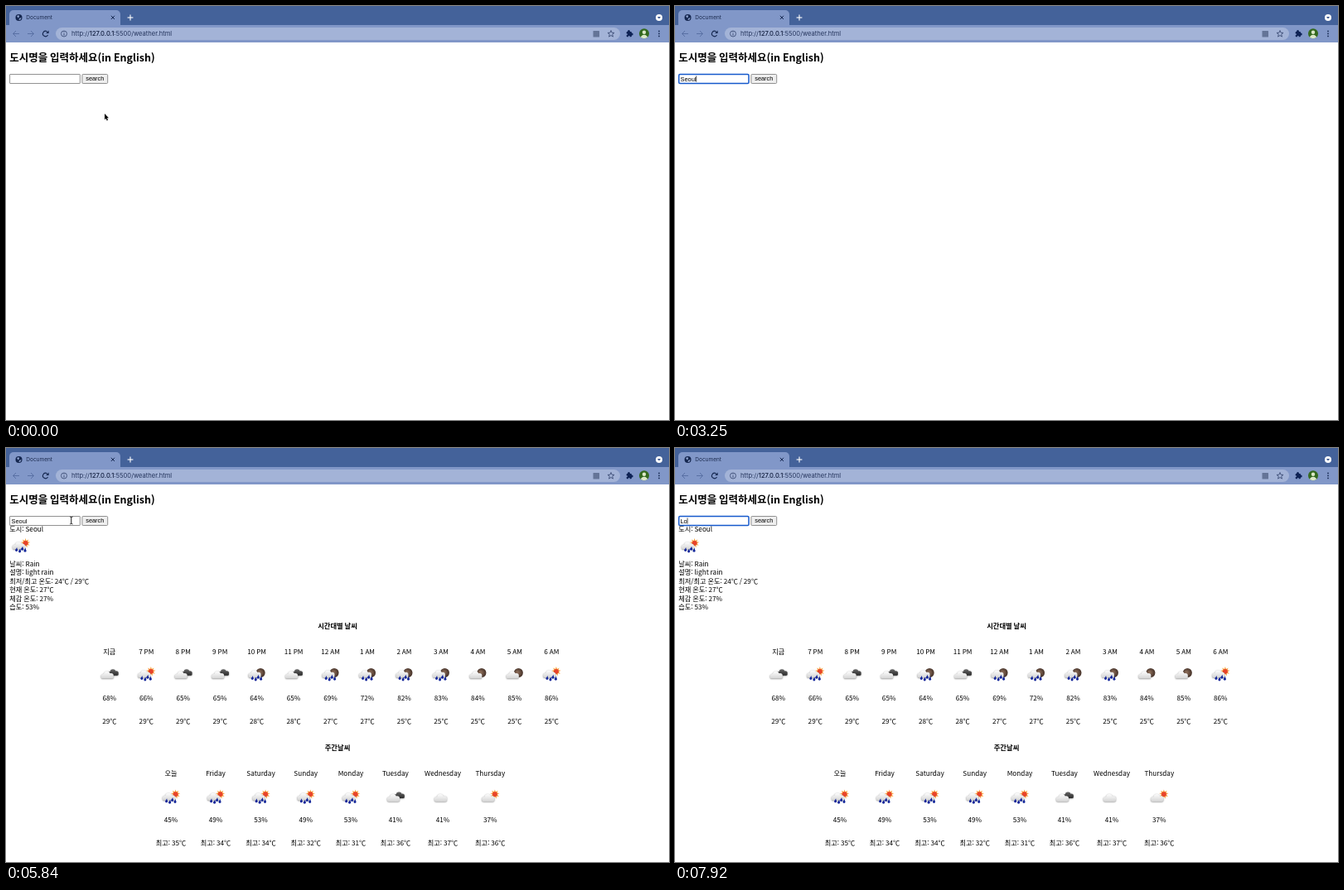
An HTML page with a canvas for the animation above (8 s loop, 800x500 px).

```html
<!DOCTYPE html>
<html lang="ko">
<head>
<meta charset="utf-8">
<title>Weather search</title>
<style>
html, body { margin: 0; width: 100%; height: 100%; overflow: hidden; background: #fff; }
canvas { display: block; width: 800px; height: 500px; }
</style>
</head>
<body>
<canvas id="stage" width="800" height="500"></canvas>
<script>
const ctx = document.getElementById('stage').getContext('2d');
const LOOP = 8000, STEP = 1000 / 12;
const KOREAN = '"Noto Sans CJK KR", "Noto Sans CJK", "Noto Sans", sans-serif';
const BODY = '8.2px ' + KOREAN;
const BOLD = 'bold 8.3px ' + KOREAN;
const FORM = '7.4px "Liberation Sans", Arial, sans-serif';
const INK = '#14264f';

const typing = [[0, ''], [1750, 'ㄴ'], [2250, ''], [2660, 'S'], [2750, 'Se'], [2830, 'Seo'],
  [3000, 'Seou'], [3080, 'Seoul'], [7080, 'Seou'], [7160, 'Seo'], [7250, 'Se'], [7330, 'S'],
  [7410, ''], [7660, 'L'], [7910, 'Lo']];
const focusSpans = [[830, 4250], [6660, LOOP]];
const hiddenSpans = [[1750, 3740], [7080, LOOP]];
const moves = [[0, 119, 130], [160, 119, 130], [166, 95, 107], [410, 95, 107], [750, 61, 88],
  [3740, 61, 88], [4160, 105, 86], [5410, 105, 86], [6160, 61, 88], [LOOP, 61, 88]];
const RESULTS_AT = 4740;

const inside = (spans, t) => spans.find(([a, b]) => t >= a && t < b);
const latest = (keys, t) => keys.filter(k => k[0] <= t).pop();

function text(str, x, y, font, color = '#000', align = 'left') {
  ctx.font = font;
  ctx.fillStyle = color;
  ctx.textAlign = align;
  ctx.fillText(str, x, y);
  return x + ctx.measureText(str).width;
}

function disc(x, y, r, color) {
  ctx.fillStyle = color;
  ctx.beginPath();
  ctx.arc(x, y, r, 0, Math.PI * 2);
  ctx.fill();
}

function line(points, color, width = 1, close = false) {
  ctx.beginPath();
  points.forEach(([x, y]) => ctx.lineTo(x, y));
  if (close) ctx.closePath();
  ctx.strokeStyle = color;
  ctx.lineWidth = width;
  ctx.stroke();
}

function shape(points, color) {
  ctx.beginPath();
  points.forEach(([x, y]) => ctx.lineTo(x, y));
  ctx.closePath();
  ctx.fillStyle = color;
  ctx.fill();
}

function ring(x, y, r, color, width, from = 0, to = Math.PI * 2) {
  ctx.beginPath();
  ctx.arc(x, y, r, from, to);
  ctx.strokeStyle = color;
  ctx.lineWidth = width;
  ctx.stroke();
}

function box(x, y, w, h, r, fill, stroke, width = 0.8) {
  ctx.beginPath();
  ctx.roundRect(x, y, w, h, r);
  if (fill) { ctx.fillStyle = fill; ctx.fill(); }
  if (stroke) { ctx.strokeStyle = stroke; ctx.lineWidth = width; ctx.stroke(); }
}

const starPoints = (x, y, outer, inner, spikes) =>
  Array.from({ length: spikes * 2 }, (_, i) => {
    const a = i * Math.PI / spikes - Math.PI / 2, r = i % 2 ? inner : outer;
    return [x + r * Math.cos(a), y + r * Math.sin(a)];
  });

function drawTabs() {
  ctx.fillStyle = '#44629a';
  ctx.fillRect(0, 0, 800, 24);
  ctx.fillStyle = '#8197c8';
  ctx.fillRect(0, 23, 800, 21);
  box(4, 5, 134, 20, [5, 5, 0, 0], '#8197c8');
  disc(15.5, 14, 4, INK);
  shape([[13, 12], [15.5, 11], [16, 13], [14.5, 14.5]], '#8fa3cf');
  shape([[16, 15], [18.5, 14], [17.5, 16.5], [15.5, 17]], '#8fa3cf');
  text('Document', 24.3, 16.3, '6.5px Inter, sans-serif', '#1d2c50');
  line([[126.8, 11.8], [131, 16]], INK);
  line([[131, 11.8], [126.8, 16]], INK);
  line([[146.6, 14], [153.4, 14]], '#fff', 1.1);
  line([[150, 10.6], [150, 17.4]], '#fff', 1.1);
  disc(788, 14, 4, '#fff');
  shape([[786, 13], [790, 13], [788, 15.5]], '#34508a');
}

function drawToolbar() {
  const pale = '#5970a4';
  line([[16, 33.5], [8.7, 33.5]], pale);
  line([[12, 30], [8.5, 33.5], [12, 37]], pale);
  line([[26, 33.5], [33.3, 33.5]], pale);
  line([[30, 30], [33.5, 33.5], [30, 37]], pale);
  ring(47.7, 33.5, 3.2, INK, 1.1, 0.5, 5.4);
  shape([[51.6, 29.6], [51.6, 33.1], [48.1, 33.1]], INK);

  box(60, 26, 681, 15, 7.5, '#a3b3d7');
  ring(70, 33.5, 3.5, '#34456e', 0.8);
  line([[70, 33], [70, 35.6]], '#34456e', 0.9);
  line([[70, 31.2], [70, 32.1]], '#34456e', 0.9);
  const url = '7.6px Inter, sans-serif';
  let x = text('http://', 79, 36.1, url, '#26365e');
  x = text('127.0.0.1', x, 36.1, '500 ' + url, '#101d3e');
  text(':5500/weather.html', x, 36.1, url, '#26365e');

  box(708.5, 30, 7.5, 7.5, 0.5, '#647497');
  line(starPoints(730, 33.7, 4.2, 1.8, 5), '#34456e', 0.8, true);
  box(748.7, 31, 6.2, 6.2, 0.8, '#0e2255');
  disc(751.5, 30.6, 1.5, '#0e2255');
  disc(755.2, 34, 1.5, '#0e2255');
  disc(748.9, 34.2, 1, '#8197c8');
  disc(751.8, 37.1, 1, '#8197c8');

  ctx.save();
  ctx.beginPath();
  ctx.arc(770, 33.3, 6, 0, Math.PI * 2);
  ctx.clip();
  ctx.fillStyle = '#33691e';
  ctx.fillRect(763, 26, 14, 15);
  disc(770, 31.8, 2.2, '#dce8c8');
  disc(770, 39, 4.2, '#dce8c8');
  ctx.restore();
  [30.4, 33.4, 36.4].forEach(y => disc(788, y, 0.85, INK));
}

function cloud(x, y, scale, top, bottom) {
  ctx.save();
  ctx.translate(x, y);
  ctx.scale(scale, scale);
  const fill = ctx.createLinearGradient(0, -5, 0, 5);
  fill.addColorStop(0, top);
  fill.addColorStop(1, bottom);
  ctx.beginPath();
  [[-5.5, 1.6, 2.9], [-1, -0.6, 4], [4, 1, 3.2]].forEach(([cx, cy, r]) => {
    ctx.moveTo(cx + r, cy);
    ctx.arc(cx, cy, r, 0, Math.PI * 2);
  });
  ctx.roundRect(-8.3, 0.8, 15.5, 3.7, 1.8);
  ctx.shadowColor = '#0007';
  ctx.shadowBlur = 1.8;
  ctx.shadowOffsetY = 0.5;
  ctx.fillStyle = fill;
  ctx.fill();
  ctx.restore();
}

// Letters: s sun, m moon, d dark cloud, r rain; the white cloud is always there.
function weather(kind, x, y) {
  const has = c => kind.includes(c);
  if (has('s')) {
    shape(starPoints(x + 5.6, y - 3.2, 5.7, 3, 9), '#f7a03c');
    disc(x + 5.6, y - 3.2, 2.9, '#e8432b');
  }
  if (has('m')) {
    const g = ctx.createRadialGradient(x + 3, y - 2, 1, x + 4.5, y - 1.5, 6);
    g.addColorStop(0, '#8a6b57');
    g.addColorStop(1, '#3f2d25');
    disc(x + 4.5, y - 1.5, 5.5, g);
  }
  if (has('d')) cloud(x + 5, y - 2, 0.82, '#686868', '#292929');
  cloud(x - 2, y + (has('r') ? 0 : 1.2), 0.98, '#fff', '#d2d2d2');
  if (has('r')) {
    [[-5.4, 5.6], [-1.4, 7], [1.6, 4.3], [5, 6.2]].forEach(([dx, dy]) => {
      disc(x + dx, y + dy, 1.45, '#14279a');
      shape([[x + dx - 1.3, y + dy - 0.4], [x + dx + 0.5, y + dy - 3.6], [x + dx + 1.4, y + dy]], '#14279a');
    });
  }
}

function drawForm(t, focused, hover) {
  text('도시명을 입력하세요(in English)', 4.2, 66.6, 'bold 12.5px ' + KOREAN);
  const [since, value] = latest(typing, t);
  if (focused) box(4.7, 82.6, 84.3, 11, 1.3, '#fff', '#1659cc', 1.5);
  else box(4.6, 82.5, 84.7, 11, 0.4, '#fff', '#767676');

  const end = text(value, 6.5, 90.6, value === 'ㄴ' ? '7.4px ' + KOREAN : FORM);
  if (value === 'ㄴ') line([[6.8, 91.9], [end - 0.3, 91.9]], '#000', 0.7);
  if (focused) {
    const start = Math.max(since, focused[0]);
    if ((t - start) % 1000 < 500) line([[end + 0.3, 84.5], [end + 0.3, 91.6]], '#000', 0.7);
  }
  box(91.9, 82.5, 30.8, 11, 1.2, hover ? '#dedede' : '#efefef', hover ? '#4f4f4f' : '#767676');
  text('search', 107.3, 90.4, FORM, '#000', 'center');
}

const hourNames = ['지금', '7 PM', '8 PM', '9 PM', '10 PM', '11 PM', '12 AM', '1 AM', '2 AM',
  '3 AM', '4 AM', '5 AM', '6 AM'];
const hourIcons = 'd sr d d mr d mr mr mr mr m m sr'.split(' ');
const hourHumidity = [68, 66, 65, 65, 64, 65, 69, 72, 82, 83, 84, 85, 86];
const hourTemps = [29, 29, 29, 29, 28, 28, 27, 27, 25, 25, 25, 25, 25];
const days = [['오늘', 199, 'sr', 45, 35], ['Friday', 253, 'sr', 49, 34], ['Saturday', 307.5, 'sr', 53, 34],
  ['Sunday', 361.7, 'sr', 49, 32], ['Monday', 416, 'sr', 53, 31], ['Tuesday', 470, 'd', 41, 36],
  ['Wednesday', 527, '', 41, 37], ['Thursday', 584.3, 's', 37, 36]];

function drawResults() {
  const center = (str, x, y, font = BODY) => text(str, x, y, font, '#000', 'center');
  text('도시: Seoul', 4.3, 101.4, BODY);
  weather('sr', 18, 118);
  ['날씨: Rain', '설명: light rain', '최저/최고 온도: 24℃ / 29℃', '현재 온도: 27℃',
    '체감 온도: 27%', '습도: 53%'].forEach((s, i) => text(s, 4.3, 142.5 + i * 10.5, BODY));

  center('시간대별 날씨', 400, 217.6, BOLD);
  hourNames.forEach((name, i) => {
    const x = 124.8 + i * 44.46;
    center(name, x, 248.5);
    weather(hourIcons[i], x, 273);
    center(hourHumidity[i] + '%', x, 304.6);
    center(hourTemps[i] + '℃', x, 333);
  });

  center('주간날씨', 400, 364.7, BOLD);
  days.forEach(([name, x, icon, humidity, high]) => {
    center(name, x, 396);
    weather(icon, x, 421.3);
    center(humidity + '%', x, 452);
    center('최고: ' + high + '℃', x, 480.2);
  });
}

function pointerAt(t) {
  const i = Math.max(1, moves.findIndex(k => k[0] > t));
  const [t0, x0, y0] = moves[i - 1], [t1, x1, y1] = moves[i];
  const u = (t - t0) / (t1 - t0), e = u * u * (3 - 2 * u);
  return [x0 + (x1 - x0) * e, y0 + (y1 - y0) * e];
}

function drawPointer(x, y, overInput) {
  if (overInput) {
    line([[x - 1.7, y - 4.2], [x, y - 3.4], [x + 1.7, y - 4.2]], '#000', 0.8);
    line([[x, y - 3.4], [x, y + 4]], '#000', 0.9);
    line([[x - 1.7, y + 4.8], [x, y + 4], [x + 1.7, y + 4.8]], '#000', 0.8);
    return;
  }
  const arrow = [[0, 0], [0, 7.3], [1.6, 5.8], [2.7, 8.4], [4, 7.8], [2.9, 5.3], [5, 5.2]]
    .map(([dx, dy]) => [x + dx, y + dy]);
  line(arrow, '#fff', 1.4, true);
  shape(arrow, '#000');
}

function draw(now) {
  const t = Math.floor((now % LOOP) / STEP + 0.01) * STEP;
  const [x, y] = pointerAt(t);
  const visible = !inside(hiddenSpans, t);
  const over = (left, right) => visible && x >= left && x <= right && y >= 82 && y <= 94;

  ctx.fillStyle = '#fff';
  ctx.fillRect(0, 0, 800, 500);
  drawTabs();
  drawToolbar();
  drawForm(t, inside(focusSpans, t), over(91.5, 123));
  if (t >= RESULTS_AT) drawResults();
  if (visible) drawPointer(x, y, over(4, 89.5));
}

const began = performance.now();
function tick() {
  draw(performance.now() - began);
  requestAnimationFrame(tick);
}
draw(0);
requestAnimationFrame(tick);
</script>
</body>
</html>
```
